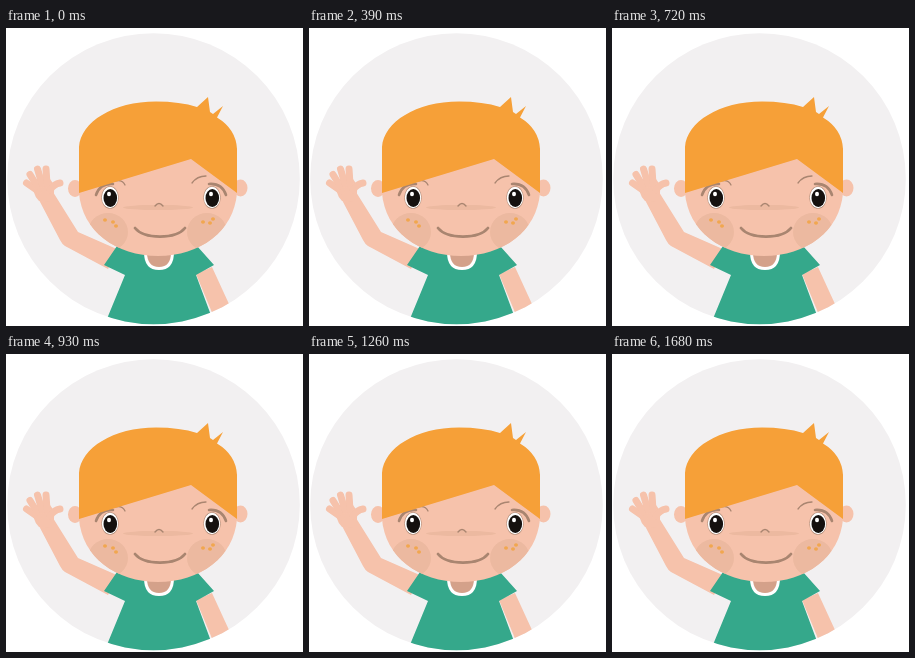
An HTML page with a canvas for the animation above (1710 ms loop, 297 px wide and 298 px high).

```html
<!DOCTYPE html>
<html lang="en">
<head>
<meta charset="utf-8">
<title>Waving boy</title>
<style>
html, body { margin: 0; width: 100%; height: 100%; overflow: hidden; background: #fff; }
canvas { display: block; width: 297px; height: 298px; }
</style>
</head>
<body>
<canvas id="stage"></canvas>
<script>
const W = 297, H = 298, LOOP = 1710, WAVE = 570;
const SKIN = '#f6c2ab', BLUSH = '#ecb9a0', BROWN = '#a98570';
const HAIR = '#f6a038', GREEN = '#35a88b', FRECKLE = '#f1a74f';
const FACE = new Path2D('M73 120 L231 120 L231 165 C228 203 194 228 152 228 C110 228 76 203 73 165Z');

const canvas = document.getElementById('stage');
const dpr = window.devicePixelRatio || 1;
canvas.width = W * dpr;
canvas.height = H * dpr;
const ctx = canvas.getContext('2d');
ctx.scale(dpr, dpr);
ctx.lineCap = 'round';
ctx.lineJoin = 'round';

function fill(path, color) {
  ctx.fillStyle = color;
  ctx.fill(new Path2D(path));
}

function stroke(path, color, width) {
  ctx.strokeStyle = color;
  ctx.lineWidth = width;
  ctx.stroke(new Path2D(path));
}

function oval(x, y, rx, ry, color) {
  ctx.fillStyle = color;
  ctx.beginPath();
  ctx.ellipse(x, y, rx, ry, 0, 0, Math.PI * 2);
  ctx.fill();
}

function drawHand(angle) {
  ctx.save();
  ctx.translate(37, 167);
  ctx.rotate(angle);
  ctx.translate(-37, -167);
  fill('M28 153 Q35 146 44 151 Q49 157 48 165 L45 174 L33 173 Q25 165 28 153Z', SKIN);
  stroke('M32 163 L20.5 155', SKIN, 7);
  stroke('M31 158 L24 146.5', SKIN, 7);
  stroke('M36 156 L31.5 141', SKIN, 7);
  stroke('M41 156 L40 141', SKIN, 7);
  stroke('M44 162 Q48 156 54 155', SKIN, 7);
  ctx.restore();
}

function drawBody() {
  fill('M47 164 L72 204 L113 222 L102 241 L59 218 Q56 216 54 212 L33 172Z', SKIN);
  fill('M190 246 L206 239 L223 276 L207 287Z', SKIN);
  fill('M111 218 L191 218 L208 237 L190 247 L209 298 L98 298 L119 247 L98 237Z', GREEN);
  fill('M138 224 L168 224 Q168 242 153 242 Q138 242 138 224Z', '#fff');
  fill('M141 224 L165 224 Q165 239 153 239 Q141 239 141 224Z', '#d4a18a');
}

function drawHead() {
  oval(69, 160.5, 7, 8.5, SKIN);
  oval(234.5, 160, 7, 8.5, SKIN);
  ctx.fillStyle = SKIN;
  ctx.fill(FACE);
  ctx.save();
  ctx.clip(FACE);
  oval(102, 204, 20, 19, BLUSH);
  oval(201, 204, 20, 19, BLUSH);
  ctx.restore();
  oval(152, 179.5, 35, 2.6, BLUSH);
  stroke('M149 178 Q153 173 157 178', BROWN, 1.4);
  stroke('M129 200 C138 211.5 170 211.5 179 200', BROWN, 2.8);
  for (const [x, y] of [[99, 192], [107, 194], [110, 198], [197, 194], [204, 195], [207, 191]])
    oval(x, y, 2, 1.8, FRECKLE);
}

function drawEyes(shut) {
  stroke('M106 154 Q116 150 119 157', BROWN, 1.3);
  stroke('M186 155 Q191 148 200 148', BROWN, 1.3);
  for (const x of [104, 206]) {
    if (shut) {
      const y = 170;
      stroke(`M${x - 13} ${y} C${x - 9} ${y - 15} ${x + 9} ${y - 15} ${x + 13} ${y}`, BROWN, 3.2);
    } else {
      const side = x < W / 2 ? -1 : 1;
      stroke(`M${x + 14 * side} 167 Q${x + 10 * side} 155 ${x - 3 * side} 156`, BROWN, 2.6);
      oval(x, 169.5, 8.7, 11.2, BROWN);
      oval(x, 169.5, 8.2, 10.7, '#fff');
      oval(x + 0.3, 170, 6.8, 9, '#15110f');
      oval(x - 1, 166, 2, 2.3, '#fff');
    }
  }
}

function drawHair() {
  fill('M73 165 L73 119 C75 94 107 73.5 150 73.5 Q174 73.5 191 79 ' +
       'L202 69 L204 84 L207 86 L217 78 L211 89.5 Q230 101 231 121 ' +
       'L231 165 L185 131Z', HAIR);
}

function draw(t) {
  const phase = (t % LOOP) % WAVE;
  const happy = phase >= 180 && phase < 360;
  ctx.fillStyle = '#fff';
  ctx.fillRect(0, 0, W, H);
  ctx.save();
  ctx.beginPath();
  ctx.ellipse(147.5, 150.7, 146.3, 145.5, 0, 0, Math.PI * 2);
  ctx.clip();
  ctx.fillStyle = '#f2f0f1';
  ctx.fillRect(0, 0, W, H);
  drawBody();
  drawHand(happy ? -0.35 : 0);
  drawHead();
  drawEyes(happy);
  drawHair();
  ctx.restore();
}

const start = performance.now();
function tick() {
  draw(performance.now() - start);
  requestAnimationFrame(tick);
}
tick();
</script>
</body>
</html>
```
